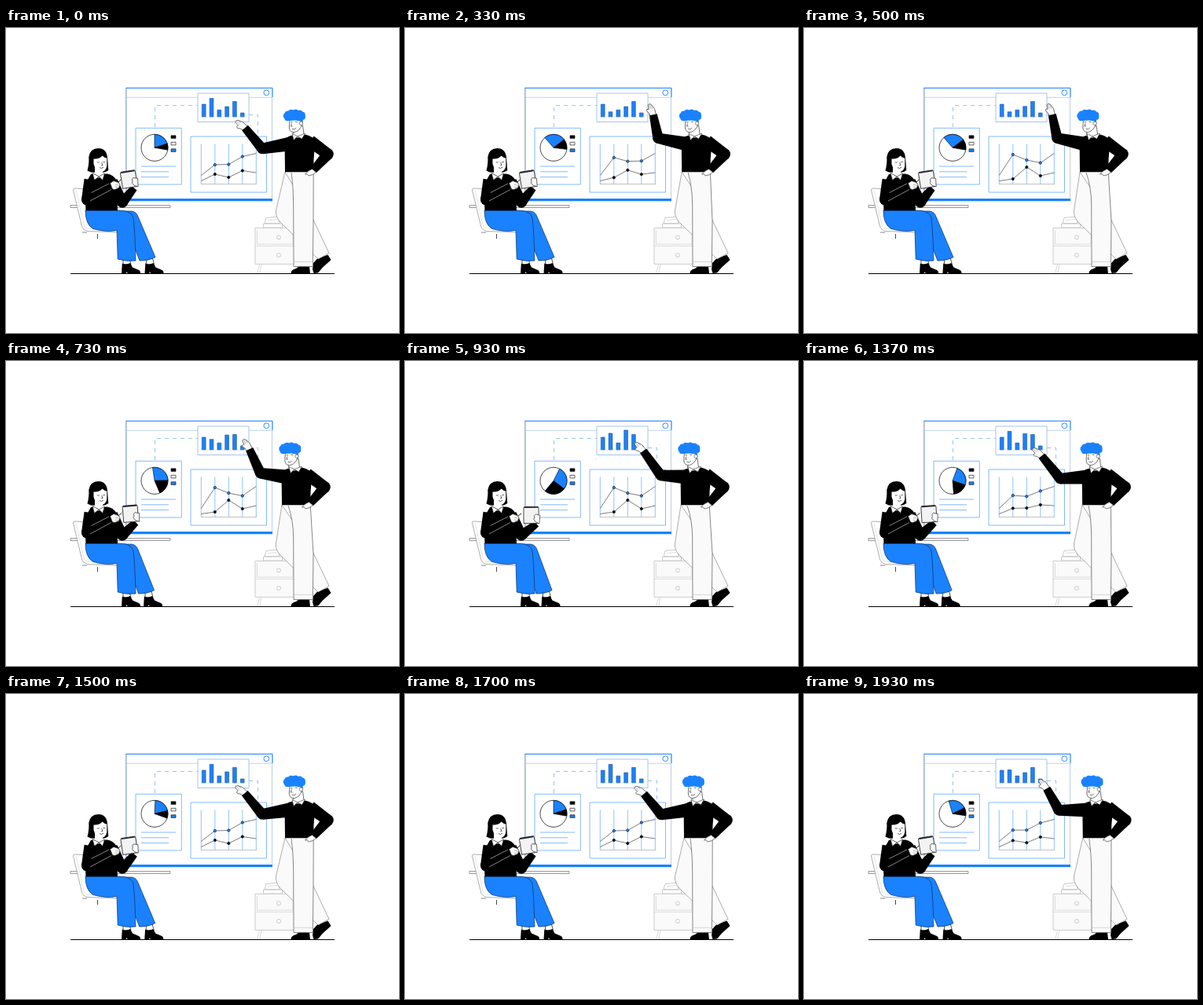
These frames come from a looping animation (500x388 px, 1.96 s). An HTML page with a canvas:

```html
<!DOCTYPE html>
<html lang="en">
<head>
<meta charset="utf-8">
<title>Presentation</title>
<style>
  html, body { margin: 0; width: 100%; height: 100%; overflow: hidden; background: #fff; }
  canvas { display: block; width: 500px; height: 388px; }
</style>
</head>
<body>
<canvas id="stage"></canvas>
<script>
const W = 500, H = 388, LOOP = 1960, CYCLE = 1775;
const BLUE = '#1a82ff', INK = '#000', PALE = '#fafafa', GREY = '#bdbdbd', THIN = '#62a9ff';
const canvas = document.getElementById('stage');
const ratio = window.devicePixelRatio || 1;
canvas.width = W * ratio;
canvas.height = H * ratio;
const c = canvas.getContext('2d');

// Smooth step from 0 to 1 between two times.
function ramp(t, from, to) {
  const u = Math.min(1, Math.max(0, (t - from) / (to - from)));
  return u * u * (3 - 2 * u);
}

// The gesture goes rest -> raised -> low -> rest; the loop cuts into the next cycle.
function poseAt(time) {
  const t = time % CYCLE;
  const up = ramp(t, 0, 360), down = ramp(t, 450, 1080), back = ramp(t, 1200, 1560);
  const mix = (rest, raised, low) =>
    rest + (raised - rest) * up + (low - raised) * down + (rest - low) * back;
  const lean = ramp(t, 100, 460) - ramp(t, 1080, 1500);
  return {
    lean,
    tilt: down - back,
    wrist: [mix(304, 316, 301), mix(127, 110, 115)],
    elbow: [mix(326, 322, 326), mix(153.5, 140, 146.5)],
    hand: mix(-141, -108, -137),
    bar2: mix(89.5, 107, 89.5),
    bar4: mix(100, 100, 86),
    pie: [mix(0, -42, 38), mix(72, 52, 140), mix(100, 97, 240)]
  };
}

function shape(d, fill, stroke, width = 0.8) {
  const p = new Path2D(d);
  if (fill) { c.fillStyle = fill; c.fill(p); }
  if (stroke) { c.strokeStyle = stroke; c.lineWidth = width; c.stroke(p); }
}
const line = (d, color, width) => shape(d, null, color, width);
const box = (x, y, w, h, fill, stroke, width) => shape(`M${x} ${y}h${w}v${h}h${-w}z`, fill, stroke, width);

function dot(x, y, r, fill, stroke, width = 0.8) {
  c.beginPath();
  c.arc(x, y, r, 0, Math.PI * 2);
  if (fill) { c.fillStyle = fill; c.fill(); }
  if (stroke) { c.strokeStyle = stroke; c.lineWidth = width; c.stroke(); }
}

function at(x, y, deg, draw) {
  c.save();
  c.translate(x, y);
  c.rotate(deg * Math.PI / 180);
  draw();
  c.restore();
}

// Tapered limb through [x, y, width] joints, flat at both ends.
function limb(joints) {
  joints.slice(1).forEach((b, i) => {
    const a = joints[i];
    const len = Math.hypot(b[0] - a[0], b[1] - a[1]);
    const nx = -(b[1] - a[1]) / len / 2, ny = (b[0] - a[0]) / len / 2;
    const side = (p, s) => `${p[0] + nx * p[2] * s} ${p[1] + ny * p[2] * s}`;
    shape(`M${side(a, 1)}L${side(b, 1)}L${side(b, -1)}L${side(a, -1)}z`, INK);
    if (i < joints.length - 2) dot(b[0], b[1], b[2] / 2, INK);
  });
}

function board() {
  box(153, 76.5, 185.5, 142, '#fff', '#b9c8dc', 0.9);
  line('M152.8 76V218', '#7d9fc9', 0.9);
  line('M339 88V76.3H152.5', BLUE, 1);
  line('M153 88.3H339', '#a9cbf5', 0.8);
  dot(331.3, 82.3, 3.4, '#fff', BLUE, 0.9);
  line('M152.5 218.6H339', BLUE, 3.2);
  c.setLineDash([5, 5]);
  line('M189.5 126V98.5H244M309 110.5H320.5V138', '#8dbdf8', 0.9);
  c.setLineDash([]);
}

function barCard(s) {
  box(244, 83, 65, 36.5, '#fff', '#9dbfe8', 0.9);
  [97, s.bar2, 104.2, s.bar4, 93.5, 108].forEach((top, i) =>
    box(249.3 + i * 9.8, top, 4.8, 113 - top, BLUE, '#1c4f98', 0.6));
  line('M247.5 113.2H305', '#bcc', 0.5);
}

function wedge(from, to, fill) {
  const rad = d => (d - 90) * Math.PI / 180;
  c.beginPath();
  c.moveTo(189, 152.3);
  c.arc(189, 152.3, 17, rad(from), rad(to));
  c.closePath();
  c.fillStyle = fill;
  c.fill();
  c.strokeStyle = INK;
  c.lineWidth = 0.6;
  c.stroke();
}

function pieCard(s) {
  box(165, 127.3, 58.3, 71.7, '#fff', THIN, 0.8);
  dot(189, 152.3, 17, '#fff', '#333', 0.9);
  wedge(s.pie[0], s.pie[1], BLUE);
  wedge(s.pie[1], s.pie[2], INK);
  [INK, '#fff', BLUE].forEach((fill, i) => box(210, 136.8 + i * 8.5, 6, 3.6, fill, '#222', 0.7));
  line('M172 176H216M172 182.8H207M172 189.6H207', THIN, 0.8);
}

function lineCard(s) {
  box(235, 138, 96.5, 71, '#fff', THIN, 0.8);
  const x = i => 248.3 + i * 17.5;
  for (let i = 0; i < 5; i++) line(`M${x(i)} 147.5V198.5`, THIN, 0.7);
  line('M248 198.5H319', '#aaa', 0.7);
  const plot = (rest, lift, fill) => {
    const ys = rest.map((y, i) => y + (lift[i - 1] || 0) * s.lean);
    line('M' + ys.map((y, i) => `${x(i)} ${y}`).join('L'), '#444', 0.7);
    for (let i = 1; i < 4; i++) dot(x(i), ys[i], 1.7, fill, '#111', 0.6);
  };
  plot([187.5, 174, 173.5, 163.5, 159.5], [-13, -5.5, 8], BLUE);
  plot([194.5, 186, 190, 181.5, 184], [6, -13, 6.5], INK);
}

function cabinet() {
  box(327.5, 249, 24, 5, '#fff', GREY);
  shape('M329 248.5L331 241.5L346 240L348 248.5z', '#fff', GREY);
  line('M333 244.5L345 243.5', '#d0d0d0', 0.7);
  box(317, 254.3, 50, 46, PALE, '#cbcbcb', 1);
  line('M317 277.3H367M319.5 257V275H365V257', '#d6d6d6', 0.8);
  [266.3, 289].forEach(y => dot(347, y, 2.5, '#fff', GREY));
  line('M322.5 301L319.5 312M325 301L322.5 312', '#cfcfcf', 0.8);
}

function pointingArm(s, shift) {
  at(...s.wrist, s.hand, () => {
    shape('M-3 -3.5L4 -4.5Q7 -7.5 9 -5.5L8.5 -3L14 -2.3Q15.5 0 13 1.8L7 4L-3 3.5z', PALE, '#444', 0.7);
    line('M8 -.8L13.5 -.3M7.5 1.7L12.5 1.8', '#777', 0.5);
  });
  limb([[...s.wrist, 10], [...s.elbow, 13.5], [361 + shift, 147.5, 18]]);
}

function manHead() {
  shape('M366 126L365 136Q372 144 379 135L377.5 124z', '#fff', '#333', 0.7);
  shape('M361 115L360.3 127Q361 133 367 132.6Q374 131 377 122L377 114z', '#fff', '#333', 0.7);
  shape('M357 112Q362 106 376 109L378 122.5L374.5 118.5L368 117.5L360 118z', BLUE);
  // Curls around the crown.
  for (let i = 0; i < 8; i++) {
    const a = (150 + i * 32) * Math.PI / 180;
    dot(367 + 10.2 * Math.cos(a), 112 + 4.6 * Math.sin(a), 4, BLUE);
  }
  dot(375.5, 121.3, 2.2, '#fff', '#444', 0.6);
  line('M362 119.8H364.5M368 119.2L370.5 119.6M363.5 121.5L362.3 125H364.5M364 128.3Q367 130 369.2 127.2', '#333', 0.7);
}

function man(s) {
  const b = -4 * s.lean;
  shape('M391 299L396 293.5L409.5 288.5L413.5 295L403 304.5L397 311.5L391.5 312L390 307z', INK);
  shape(`M${355 + b} 183L343.5 232Q342.5 240 349 247L397 294L411 286.3L388 238z`, PALE, '#8a8a8a', 0.7);
  shape('M362.5 312.5Q362 307.5 369 306L373 303H386L387 312.5z', INK);
  const front = `M${363 + b} 184Q365.5 202 365.7 225L366 303.5H390.3L391 245L${391.2 + b} 183`;
  shape(front, PALE);
  line(front, '#555', 0.7);
  line('M366 297.3H390.3', '#bbb', 0.6);

  pointingArm(s, b);
  at(b, 0, 0, () => {
    limb([[387, 144, 16], [409.5, 160.5, 14.5], [391, 181, 10]]);
    shape('M354.5 141Q360 137 366 136Q373 142 380.5 135.5Q390 137.5 393.5 143L391.5 167L391.3 183.3H355z', INK);
    shape('M394.5 183.5L389.5 179.5Q383 182 380.5 186L383.3 185.8L385 188L390 186.7z', PALE, '#444', 0.7);
  });
  at(-5.5 * s.lean, 0, 0, manHead);
  at(b, 0, 0, () =>
    shape('M364 134.5L366 142.5L371 137.8zM371 137.8L376.5 141L380.5 134z', '#fff', '#333', 0.6));
}

function chair() {
  shape('M85.5 206Q85.5 204 88 204L98 204.5L107 240L145 254V260L104 258.5Q98 257 96.5 252z', '#fff', '#999', 0.8);
  line('M89 206L99.5 252Q101 255.5 106 255.5H145', '#d8d8d8', 0.7);
  line('M116.5 262V268', '#333', 0.9);
  line('M97 260H103', '#666', 0.8);
}

function shoe(x) {
  shape(`M${x + 2} 294V301H${x + 12}L${x + 10} 293z`, '#fff', '#222', 0.8);
  shape(`M${x} 312.3L${x + 0.8} 299.5Q${x + 6} 301.5 ${x + 11} 299L${x + 14} 304.5L${x + 21} 307.5Q${x + 24.5} 309 ${x + 24} 312.3H${x + 8}L${x + 6} 310V312.3z`, INK);
}

function legs(s) {
  const f = -3.5 * s.tilt;
  shoe(176.5 + f);
  shoe(147);
  shape(`M138 233H160Q166 234 168 240L${190 + f} 291.5Q${182 + f} 296 ${170 + f} 296L152 250z`, BLUE, '#0c2f66', 0.7);
  shape('M101 232L142 232Q158 231.5 161.5 240Q163.5 246 165 296Q153 297.5 142.2 294L141 257.5Q126 260 111 255.5Q101 250 101 232z', BLUE, '#0c2f66', 0.7);
}

function notepad(x, y, deg) {
  at(x, y, deg, () => {
    shape('M-8 -10H8.5Q9.8 -10 9.8 -8V11H-9.3V-8Q-9.3 -10 -8 -10z', '#f3f3f3', '#333', 0.9);
    line('M-8.5 -9.3H9', '#222', 1.6);
    shape('M11.5 1L6 -.5Q3 1.5 4.5 3.5L3.5 6L6 9.5L10.5 11.5z', PALE, '#333', 0.7);
  });
}

function womanHead() {
  shape('M103.5 181.5Q106 172 105.3 164Q107 153.2 117.5 153Q128 153.3 129 165L130.3 181Q126 184.5 121 184L108 183.5z', INK);
  shape('M113 176V188Q118 193 123 187.5V180z', '#fff');
  shape('M111.5 166.5Q119 167 122.5 162.5Q125 165 128.3 165.5L128.3 176Q126.5 183.3 121 183Q113.5 181 111.5 173z', '#fff');
  line('M115.8 170.7Q117.3 171.7 118.8 170.6M123.3 170.3Q124.8 171.2 126.2 170.1M121.7 171L123 174.5H121.3M119 177.6Q121.7 179.6 124 177.2', '#222', 0.7);
  shape('M110 184.5L112.5 193.5L118.3 189zM118.3 189L123 193.5L125.5 185z', '#fff', '#222', 0.7);
}

function woman(s) {
  const padX = 156 + 5 * s.tilt, padY = 192 + 4 * s.tilt;
  legs(s);
  shape('M108 186Q113 185 117.5 190Q122 185 129 185.5Q137 186.5 140.5 194L142 232.2H101.5L100 200z', INK);
  // The far forearm follows the hand holding the pad.
  limb([[135, 195, 14], [148, 222, 13.5], [padX + 7, padY + 11.5, 9]]);
  notepad(padX, padY, -9 + 10 * s.tilt);
  limb([[107, 193, 15], [103, 218.5, 14], [135, 201.5, 9]]);
  line('M107 220L134 205.5M108.5 209.5L131 198', '#ddd', 0.6);
  line(`M136 203L${146.5 + 2 * s.tilt} ${192.5 + 1.6 * s.tilt}`, '#222', 1);
  shape('M132.5 197.5L137 194.5L143 196.5L145 199.5L143.5 203.5L138.5 205.5L135.5 205z', PALE, '#333', 0.7);
  line('M139 199L144 200.5M138.5 202L142.5 203', '#777', 0.5);
  womanHead();
}

function draw(t) {
  const s = poseAt(t);
  c.setTransform(ratio, 0, 0, ratio, 0, 0);
  c.lineJoin = 'round';
  c.fillStyle = '#fff';
  c.fillRect(0, 0, W, H);
  board();
  pieCard(s);
  lineCard(s);
  barCard(s);
  cabinet();
  line('M82 312.5H418', INK, 1);
  man(s);
  box(82, 225.5, 127, 3, '#eee', '#777', 0.7);
  chair();
  woman(s);
}

const start = performance.now();
function tick() {
  draw((performance.now() - start) % LOOP);
  requestAnimationFrame(tick);
}
tick();
</script>
</body>
</html>
```
